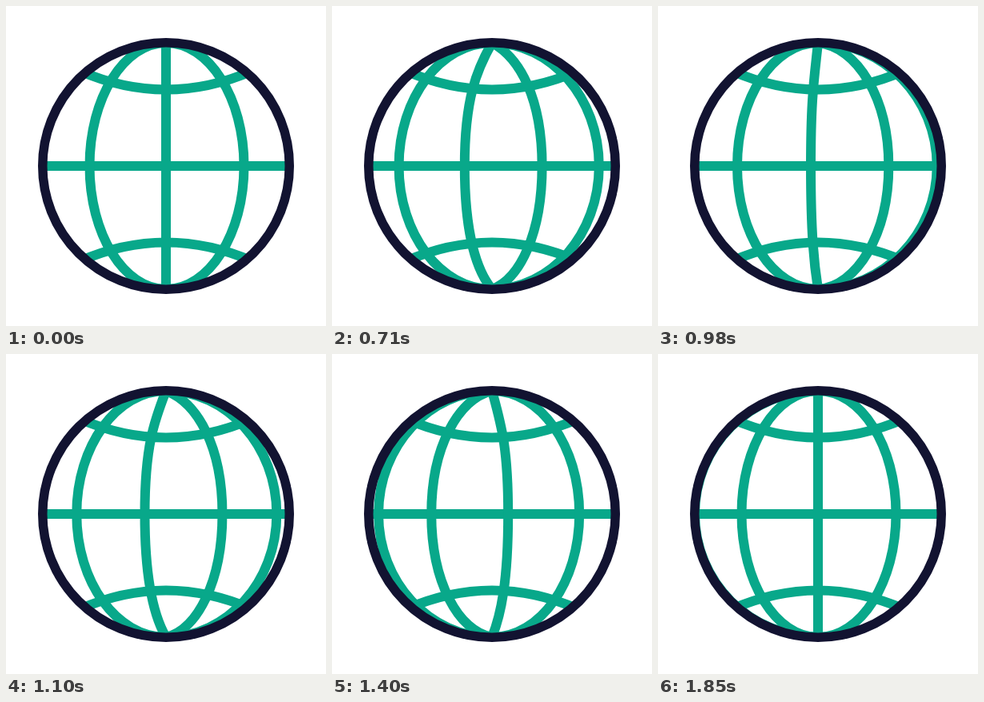
Recreate the animation shown at these times as an HTML page. Size 400x400 px, loop 1.94 s.

```html
<!DOCTYPE html>
<html lang="en">
<head>
<meta charset="utf-8">
<title>Spinning globe</title>
<style>
  html, body { margin: 0; width: 100%; height: 100%; overflow: hidden; background: #fff; }
  svg { display: block; width: 100%; height: 100%; }
  path, .ring { fill: none; stroke-width: 12; }
  path { stroke: #08a88a; }
  .ring { stroke: #121331; stroke-width: 11.5; }
</style>
</head>
<body>
<svg viewBox="-200 -200 400 400">
  <clipPath id="disc"><circle r="155"/></clipPath>
  <g clip-path="url(#disc)">
    <path d="M-154 0H154"/>
    <path d="M-108 -119Q0 -72 108 -119"/>
    <path d="M-108 119Q0 72 108 119"/>
    <g id="meridians"></g>
  </g>
  <circle class="ring" r="154.25"/>
</svg>
<script>
const LOOP = 1940, START = 500, STEP = 30, STEPS = 45;
const R = 154;

// Resting meridians, left to right: equator offset and handle lengths at the poles
const stops = [
  { x: -154, top: 0, bottom: 0 },
  { x: -95.5, top: 0, bottom: 0 },
  { x: 0, top: 52, bottom: 35 },
  { x: 97.5, top: 0, bottom: 0 },
  { x: 154, top: 0, bottom: 0 }
];

// Spin curve: step, stops travelled, speed per step
const spin = [
  [0, 0, 0.15],
  [1, 0.172, 0.195],
  [7, 1.642, 0.265],
  [16, 3.906, 0.22],
  [24, 5.415, 0.158],
  [37, 6.782, 0.059],
  [45, 7, 0]
];

const lerp = (a, b, k) => a + (b - a) * k;

function travel(n) {
  const i = Math.max(1, spin.findIndex(([s]) => s >= n));
  const [n0, p0, v0] = spin[i - 1], [n1, p1, v1] = spin[i];
  const d = n1 - n0, k = (n - n0) / d, q = 1 - k;
  return p0 * q * q * (1 + 2 * k) + p1 * k * k * (3 - 2 * k)
    + d * k * q * (v0 * q - v1 * k);
}

function meridian(a, b, k) {
  const x = lerp(a.x, b.x, k), cx = x * 0.5523, cy = 85;
  const top = lerp(a.top, b.top, k) - R, bottom = R - lerp(a.bottom, b.bottom, k);
  return `M0 ${-R}C${cx} ${top} ${x} ${-cy} ${x} 0C${x} ${cy} ${cx} ${bottom} 0 ${R}`;
}

const group = document.getElementById("meridians");
const lines = stops.slice(1).map(() =>
  group.appendChild(document.createElementNS("http://www.w3.org/2000/svg", "path")));

function draw(time) {
  const n = Math.floor((time % LOOP - START) / STEP);
  const p = travel(Math.min(STEPS, Math.max(0, n)));
  lines.forEach((line, i) =>
    line.setAttribute("d", meridian(stops[i], stops[i + 1], p % 1)));
  // The next meridian only enters once the spin is under way
  lines[0].style.display = p < 0.2 ? "none" : "";
}

let begin;
function tick(now) {
  begin ??= now;
  draw(now - begin);
  requestAnimationFrame(tick);
}
draw(0);
requestAnimationFrame(tick);
</script>
</body>
</html>
```
